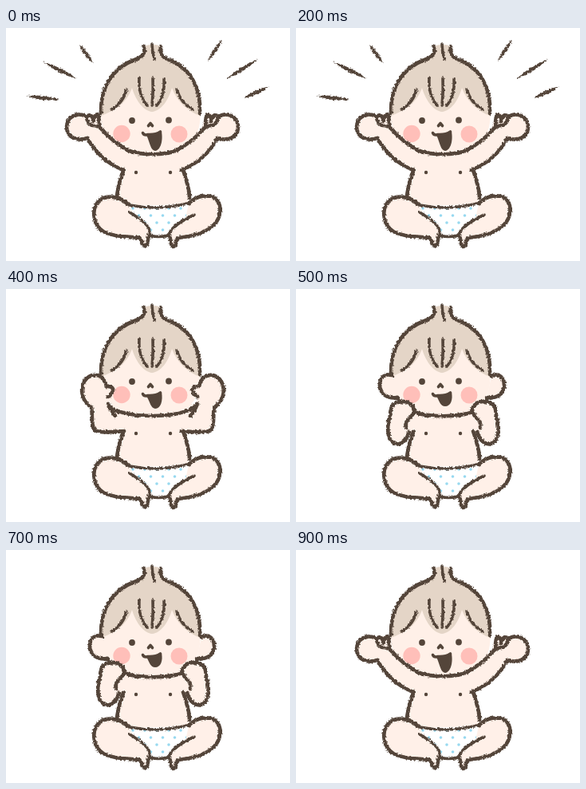
An HTML page that plays this animation: 356x292 px, repeating every 1000 ms.

```html
<!DOCTYPE html>
<html lang="en">
<head>
<meta charset="utf-8">
<title>Happy baby</title>
<style>
  html, body { margin: 0; width: 100%; height: 100%; overflow: hidden; background: #fff; }
  svg { display: block; width: 100%; height: 100%; }
  .skin { fill: #fff0e8; }
  .hair { fill: #e4d5c7; }
  .cheek { fill: #ffbfb9; }
  .ink { fill: none; stroke: #54453a; stroke-width: 4.7; stroke-linecap: round; stroke-linejoin: round; }
  .fine { stroke-width: 3.6; }
  .solid { fill: #54453a; }
</style>
</head>
<body>
<svg id="stage" viewBox="0 0 356 292" xmlns="http://www.w3.org/2000/svg">
  <defs>
    <filter id="crayon" filterUnits="userSpaceOnUse" x="0" y="0" width="356" height="292" color-interpolation-filters="sRGB">
      <feTurbulence type="fractalNoise" baseFrequency="0.4" numOctaves="2" seed="4" result="grain"/>
      <feDisplacementMap in="SourceGraphic" in2="grain" scale="3.6" xChannelSelector="R" yChannelSelector="G"/>
    </filter>
    <pattern id="dots" width="15" height="18" x="155" y="222" patternUnits="userSpaceOnUse">
      <circle cx="4" cy="4" r="1.8" fill="#98d9f0"/>
      <circle cx="11.500" cy="13" r="1.8" fill="#98d9f0"/>
    </pattern>
    <path id="diaper" d="M155 221 Q190 229 228 220 L227 238 C214 245 207 250 204 260 L180 261 C181 251 172 244 160 236Z"/>
  </defs>

  <path class="skin" d="M130 144 L148 176 C143 190 139 202 139 216 L155 223 L229 221 L230 214 C229 200 226 190 221 176 L238 144Z"/>
  <use href="#diaper" fill="#fff"/>
  <use href="#diaper" fill="url(#dots)"/>
  <path class="skin" d="M153 221 C143 211 126 208 116 217 C106 228 110 248 122 255 C135 262 150 261 167 263 C171 264 169 272 174 273 C178 273 177 266 180 257 C182 250 172 244 161 235Z"/>
  <path class="skin" d="M229 220 C238 210 256 207 264 215 C272 225 269 240 258 249 C246 259 231 261 216 263 C213 266 214 274 209 274 C206 273 208 266 204 259 C207 250 215 245 225 239Z"/>
  <path class="skin" d="M119 95 C117 134 128 159 183 159 C238 159 246 132 243 95 L212 70 L152 70Z"/>
  <path class="hair" d="M172 23 C182 20 188 20 194 23 C194 33 196 37 204 39 C231 49 245 75 243 110 C228 104 214 92 208 75 C203 92 194 104 183 105 C173 104 163 92 158 75 C152 93 136 104 119 110 C116 76 133 48 161 39 C171 36 173 32 172 23Z"/>
  <circle class="cheek" cx="145" cy="132.500" r="10.700"/>
  <circle class="cheek" cx="217" cy="133" r="10.500"/>

  <g id="armFills" class="skin"></g>

  <g filter="url(#crayon)">
    <g class="ink">
      <path d="M173 23 C175 34 171 36 161 40 C133 50 118 76 119 107"/>
      <path d="M194 23 C193 34 196 37 205 40 C231 50 245 76 243 107"/>
      <path d="M147 179 C143 190 139 203 139 214"/>
      <path d="M222 178 C226 190 230 202 230 213"/>
      <path d="M153 221 C143 211 126 208 116 217 C106 228 110 248 122 255 C135 262 150 261 167 263 C171 264 169 272 174 273 C178 273 177 266 180 257"/>
      <path d="M229 220 C238 210 256 207 264 215 C272 225 269 240 258 249 C246 259 231 261 216 263 C213 266 214 274 209 274 C206 273 208 266 204 259"/>
    </g>
    <g class="ink fine">
      <path d="M183 20 Q183 30 186 39"/>
      <path d="M151 77 C149 87 142 97 132 102"/>
      <path d="M214 77 C217 87 224 97 234 102"/>
      <path d="M167 63 C166 77 170 89 177 97"/>
      <path d="M184 63 Q185 80 183 97"/>
      <path d="M198 64 C199 78 196 89 189 97"/>
      <path d="M155 222 Q190 229 227 220"/>
      <path d="M155 231 C170 240 182 250 180 257 M236 234 C219 242 207 250 204 259"/>
      <path d="M180 260 Q191 263 203 260"/>
    </g>
    <g id="armLines" class="ink"></g>
    <path id="chin" class="ink"/>
    <path id="rays" class="solid"/>
  </g>

  <g class="solid">
    <circle cx="158" cy="116" r="3.900"/>
    <circle cx="204" cy="115.500" r="3.900"/>
    <circle cx="163" cy="181" r="2.200"/>
    <circle cx="206" cy="181" r="2.200"/>
    <path id="mouth"/>
  </g>
  <path class="ink fine" d="M178.500 122.500 L181 119.500 L183.500 122.500"/>
  <path class="ink fine" d="M171.500 131.500 Q173 135 178 133.500 Q188 134 193.500 130"/>
</svg>
<script>
const el = id => document.getElementById(id);

// Left side of each pose; the right side is reflected around axis / 2.
const wide = {
  axis: 367,
  fill: "M120 123 C119 114 117 107 113 107 Q108 107 107 111 Q103 107 100 111 C88 104 76 112 76 125 C77 138 90 142 102 138 C110 153 124 169 147 178 L166 160 L153 153 Q133 139 120 123Z",
  lines: "M101 111 C88 104 76 112 76 125 C77 138 90 142 102 138 C110 153 124 169 147 178 M101 111 Q101 117 106 121 M102 110 Q108 107 110 117 M110 113 Q114 105 116 111 Q117 116 117 122 M108 122 Q116 122 121 128 Q135 144 153 153",
  chin: "M152 153 C168 160 199 160 215 153",
  mouth: "M176 134 Q186 135 195 130 C197 141 194 153 187 154 C181 153 181 145 176 134Z"
};

const middle = {
  axis: 368,
  fill: "M123 114 C117 105 104 106 98 116 C92 127 96 142 107 148 C109 158 106 170 111 177 C118 181 135 179 148 178 L150 156 L129 146 L128 135 Q136 130 134 124 L126 122Z",
  lines: "M123 114 C117 105 104 106 98 116 C92 127 96 142 107 148 C109 158 106 170 111 177 C118 181 135 179 148 178 M121 111 Q125 117 126 122 Q135 122 134 127 Q132 133 128 135 M128 144 Q132 154 137 159",
  chin: "M129 147 C147 163 220 163 237 147",
  mouth: "M176 134 Q186 134 195 129 C197 140 194 150 187 150 C181 149 181 142 176 134Z"
};

const tucked = {
  axis: 369,
  fill: "M147 156 C151 147 141 140 132 141 C118 143 119 150 117 158 C114 168 114 178 116 186 C120 194 127 196 132 193 C139 191 142 184 147 176Z",
  lines: "M138 174 C136 165 143 163 147 156 C151 147 141 140 132 141 C118 143 119 150 118 158 C115 168 114 178 117 186 C120 194 127 196 132 193 C137 191 140 185 142 179",
  ear: "M121 109 C111 104 105 112 105 121 C106 132 115 138 127 136",
  chin: "M127 136 Q129 140 132 142 M148 154 C165 161 203 161 221 154 M237 142 Q239 140 240 136",
  mouth: "M176 134 Q186 134 195 129 C197 139 194 147 187 147 C181 147 180 141 176 134Z"
};

const ray = (x1, y1, x2, y2) => {
  const len = Math.hypot(x2 - x1, y2 - y1);
  const nx = (y1 - y2) / len * 4.8, ny = (x2 - x1) / len * 4.8;
  const mx = (x1 + x2) / 2, my = (y1 + y2) / 2;
  return `M${x1} ${y1}Q${mx + nx} ${my + ny} ${x2} ${y2}Q${mx - nx} ${my - ny} ${x1} ${y1}Z`;
};

const burst = ray(46, 42, 89, 64) + ray(92, 21, 109, 44) + ray(25, 85, 67, 90) +
  ray(271, 15, 253, 41) + ray(316, 39, 276, 64) + ray(330, 73, 298, 88);

const pair = (d, axis) =>
  `<path d="${d}"/><path d="${d}" transform="matrix(-1 0 0 1 ${axis} 0)"/>`;

function draw(pose, shout) {
  const ears = pose.ear ? pair(pose.ear, 366) : "";
  el("armFills").innerHTML = ears + pair(pose.fill, pose.axis);
  el("armLines").innerHTML = ears + pair(pose.lines, pose.axis);
  for (const part of ["chin", "mouth"]) el(part).setAttribute("d", pose[part]);
  el("rays").setAttribute("d", shout ? burst : "");
}

const STEP = 100;
const cycle = [wide, wide, wide, wide, middle, tucked, tucked, tucked, middle, wide];
const start = performance.now();
let shown = -1;

function update(now) {
  const step = Math.floor(Math.max(0, now - start) / STEP) % cycle.length;
  if (step !== shown) {
    draw(cycle[step], step < 3);
    shown = step;
  }
  requestAnimationFrame(update);
}
update(start);
</script>
</body>
</html>
```
